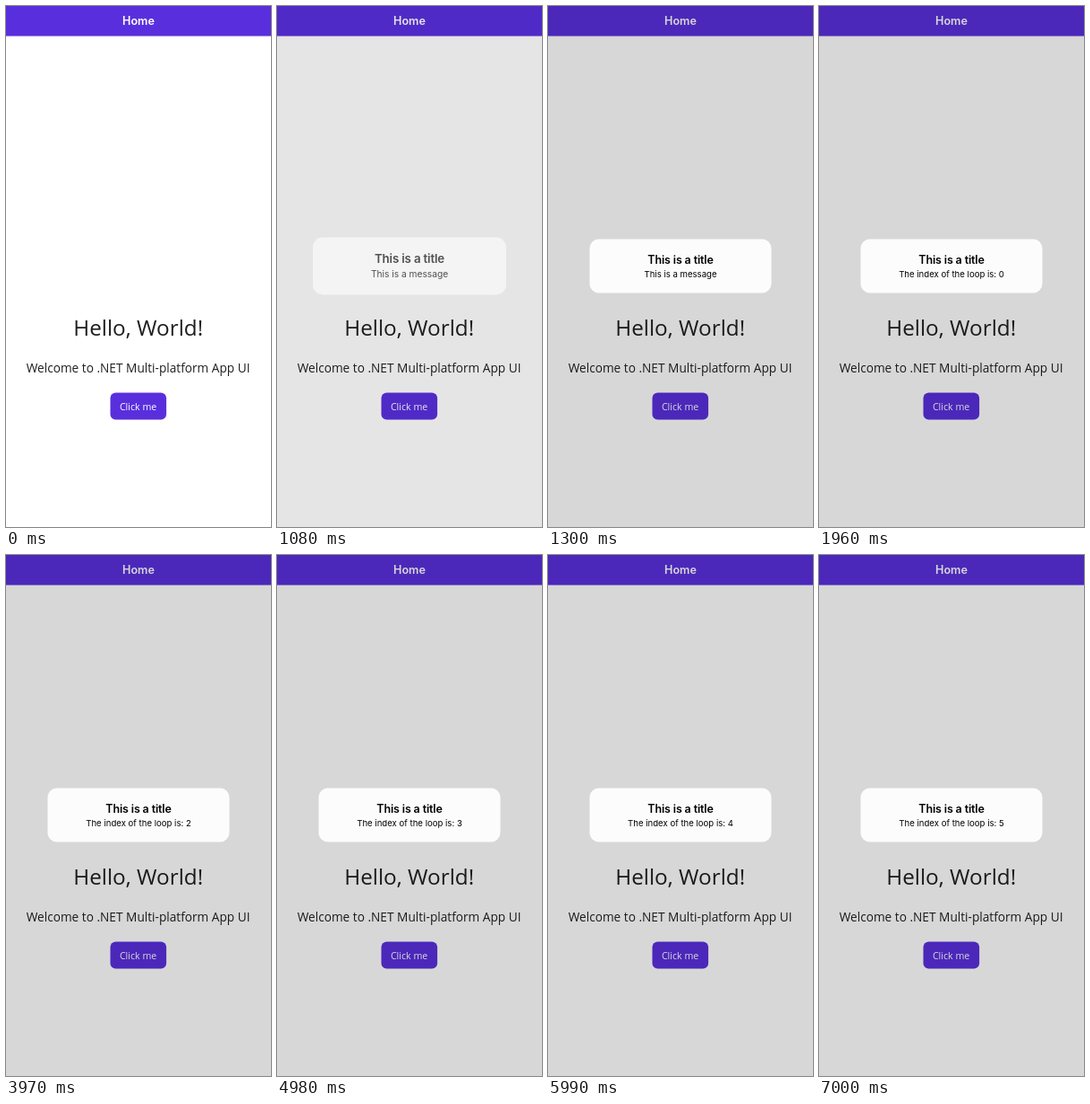
These frames come from a looping animation (296 px wide and 580 px high, 8000 ms). An HTML page:

```html
<!DOCTYPE html>
<html lang="en">
<head>
<meta charset="utf-8">
<title>Alert loop</title>
<style>
  html, body { margin: 0; width: 100%; height: 100%; overflow: hidden; background: #fff; }
  svg { display: block; }
  text { text-anchor: middle; font-family: "Open Sans", sans-serif; fill: #1f1f1f; }
  .ui { font-family: Inter, sans-serif; }
  .bold { font-weight: 600; }
  .accent { fill: #592fdd; }
  .light { fill: #fff; }
  .card text { fill: #000; }
</style>
</head>
<body>
<svg width="296" height="580" viewBox="0 0 296 580">
  <rect class="accent" width="296" height="33.5"/>
  <text class="ui bold light" x="148" y="21.3" font-size="12.6">Home</text>
  <text x="147.7" y="367.3" font-size="24.3">Hello, World!</text>
  <text x="147.6" y="408" font-size="13.66">Welcome to .NET Multi-platform App UI</text>
  <rect class="accent" x="116.5" y="430.5" width="62.6" height="30" rx="6"/>
  <text class="light" x="147.6" y="449.6" font-size="10.63">Click me</text>
  <rect id="dim" width="296" height="580" opacity="0"/>
  <g id="card" class="card" opacity="0">
    <rect x="-101.5" y="-30" width="203" height="60" rx="10.6" fill="#fcfcfc"/>
    <text class="ui bold" y="-3" font-size="12.5" letter-spacing="-.15">This is a title</text>
    <text id="message" class="ui" y="12" font-size="9.6"></text>
  </g>
</svg>
<script>
const LOOP = 8000, DIM = 0.155;
const $ = id => document.getElementById(id);

// [start ms, progress of the alert's entrance]
const entrance = [[0, 0], [1080, 0.65], [1190, 0.92], [1300, 1]];
// start of each loop index shown in the message
const ticks = [1960, 2970, 3970, 4980, 5990, 7000];

function draw(t) {
  const p = entrance.filter(([start]) => start <= t).pop()[1];
  const index = ticks.filter(start => start <= t).length - 1;
  const scale = 1 + 0.183 * (1 - p);
  $("dim").setAttribute("opacity", DIM * p);
  $("card").setAttribute("opacity", p);
  $("card").setAttribute("transform", `translate(148 289.5) scale(${scale})`);
  $("message").textContent = index < 0 ? "This is a message" : `The index of the loop is: ${index}`;
}

const begin = performance.now();
function tick() {
  draw((performance.now() - begin) % LOOP);
  requestAnimationFrame(tick);
}
tick();
</script>
</body>
</html>
```
